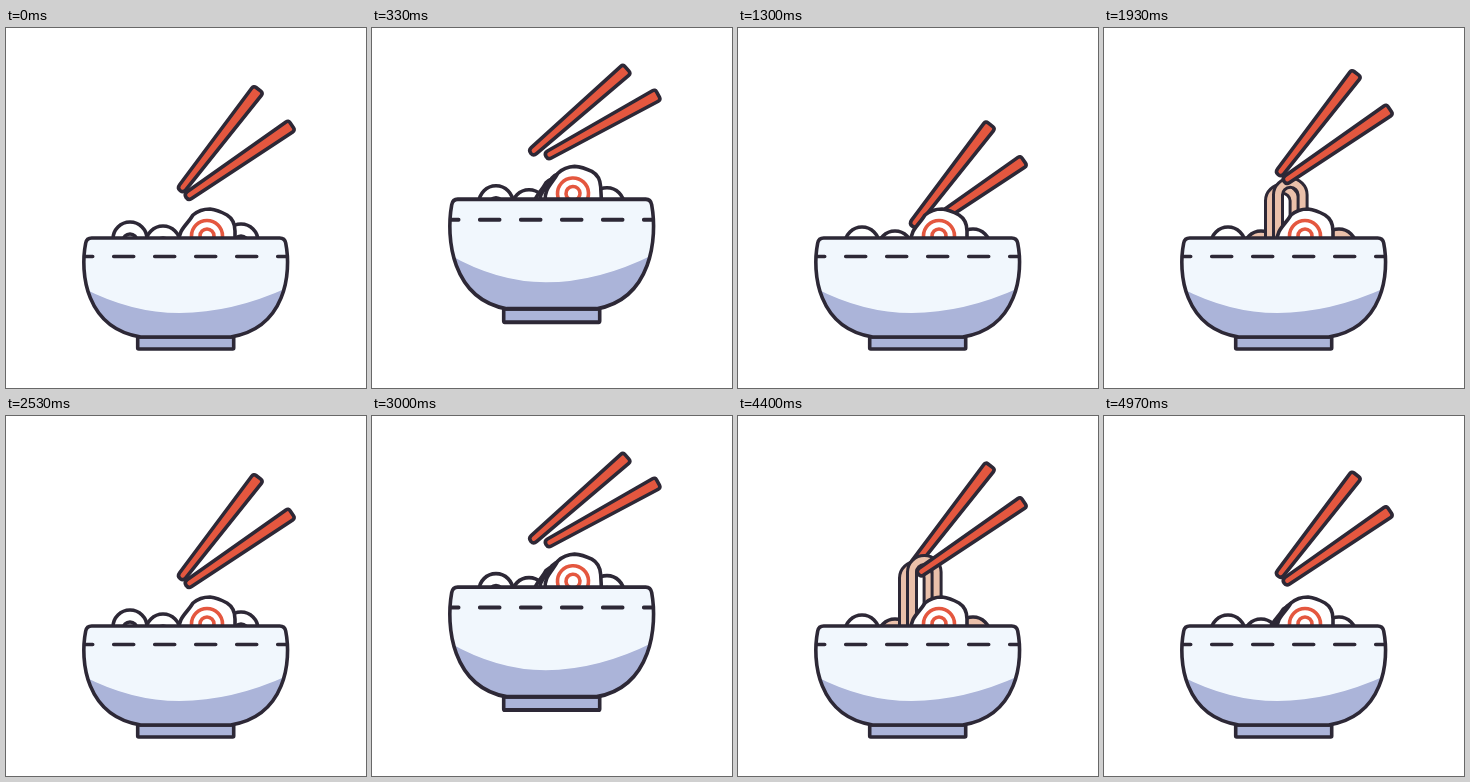
These frames come from a looping animation (360x360 px, 5000 ms). An HTML page with a canvas:

```html
<!DOCTYPE html>
<html lang="en">
<meta charset="utf-8">
<title>Noodle bowl</title>
<style>
html, body { margin: 0; width: 100%; height: 100%; overflow: hidden; background: #fff }
canvas { display: block }
</style>
<canvas id="stage" width="360" height="360"></canvas>
<script>
const c = document.getElementById('stage').getContext('2d');
const LOOP = 5000, CYCLE = 2667;
const INK = '#2d2836', RED = '#e4573f', PALE = '#f1f7fd', SHADE = '#abb4d9', PEACH = '#eac0aa';

// Smooth step from 0 to 1 between two times.
function ease(t, from, to) {
  const u = Math.min(1, Math.max(0, (t - from) / (to - from)));
  return u * u * (3 - 2 * u);
}

// Smooth rise to 1 at the peak, then back to 0.
const pulse = (t, from, peak, to) => ease(t, from, peak) - ease(t, peak, to);

function shape(path, fill, width = 3.6, stroke = INK) {
  const p = new Path2D(path);
  if (fill) { c.fillStyle = fill; c.fill(p); }
  if (width) { c.lineWidth = width; c.strokeStyle = stroke; c.stroke(p); }
}

function ring(x, y, r, fill, stroke = INK) {
  c.beginPath();
  c.arc(x, y, r, 0, 7);
  if (fill) { c.fillStyle = fill; c.fill(); }
  c.lineWidth = 3.6;
  c.strokeStyle = stroke;
  c.stroke();
}

function moved(x, y, draw, turn = 0) {
  c.save();
  c.translate(x, y);
  c.rotate(turn * Math.PI / 180);
  draw();
  c.restore();
}

function chopstick(x, y, angle) {
  moved(x, y, () => shape('M-6-1Q-6-4-3-4H3Q6-4 6-1L4 120Q4 124 0 124Q-4 124-4 120Z', RED), angle);
}

function noodles(drop) {
  for (const [x, top] of [[166, 150], [174, 144]]) {
    const arch = `M${x} 290V${top + drop + 12}a12.3 12 0 0 1 24.6 0V290`;
    shape(arch, null, 12);
    shape(arch, null, 6, PEACH);
  }
}

function loops(y, lifted) {
  for (const [x, low] of [[157, 4], [235, 2], [124, 0]]) {
    const fill = lifted && x > 130 ? PEACH : '#fff';
    ring(x, y + low + 1, 17, fill);
    ring(x, y + low + 3, 7, fill);
  }
}

function fishCake(y, turn, side) {
  const body = 'M-28 6C-29-6-20-11-14-21Q-7-27 3-27Q11-26 20-21Q28-16 28-5V14Q20 26 0 26Q-22 24-28 6Z';
  if (side > .03)
    for (const k of [12, 6])
      moved(201 - k * side, y + k * side * .8, () => shape(body, '#fff'), turn);
  moved(201, y, () => {
    shape(body, '#fff');
    for (const r of [15.5, 7]) ring(0, 0, r, null, RED);
  }, turn);
}

function bowl() {
  const body = 'M86 210H274Q279 210 280 215C286 245 280 300 225 309H135C80 300 74 245 80 215Q81 210 86 210Z';
  shape('M132 309H228V320Q228 321 227 321H133Q132 321 132 320Z', SHADE);
  c.save();
  c.clip(new Path2D(body));
  shape(body, PALE, 0);
  shape('M70 256Q122 285 174 285Q230 285 290 256V320H70Z', SHADE, 0);
  c.lineCap = 'round';
  c.setLineDash([20, 21]);
  shape('M67 228.5H294');
  c.restore();
  shape(body);
}

function draw(time) {
  const t = time % LOOP % CYCLE;
  const float = pulse(t, 60, 333, 760);
  const squash = pulse(t, 50, 140, 260), land = pulse(t, 540, 630, 780);

  // Bowl: crouch, jump, land, settle.
  const rise = -27 * pulse(t, 130, 340, 610) - 4 * pulse(t, 620, 680, 770);
  const wide = 1 + .02 * squash + .045 * land + .015 * pulse(t, 800, 933, 1100);
  const tall = 1 - .045 * squash + .108 * pulse(t, 180, 340, 540) - .03 * land;
  const rim = 321 + rise - 111 * tall;

  // Chopsticks: float with the jump, dip for noodles, lift them.
  const hand = 1.5 - 21 * float + 43 * pulse(t, 1030, 1400, 1700) - 17 * pulse(t, 1560, 1840, 2450);
  const drop = 80 * (1 - ease(t, 1380, 1740) + ease(t, 1850, 2200));

  // Toppings trail behind the bowl.
  const hop = 9 * pulse(t, 120, 590, 860);
  const side = ease(t, 130, 300) - ease(t, 670, 1050) + .65 * pulse(t, 2150, 2303, 2480);
  const sink = 5 * (ease(t, 680, 930) - ease(t, 2320, 2530)) + 2.5 * pulse(t, 130, 333, 600);

  c.fillStyle = '#fff';
  c.fillRect(0, 0, 360, 360);
  c.lineJoin = 'round';

  loops(rim + sink, t > 1450 && t < 2200);
  chopstick(250 + 2 * float, 63 + hand, 37.7 + 11 * float);
  if (drop < 75) noodles(drop);
  chopstick(282.5, 98 + hand - 10 * float, 55.7 + 5.4 * float);
  fishCake(rim - 2 - hop, -hop * .8, side);

  c.save();
  c.translate(179.7, 321 + rise);
  c.scale(wide, tall);
  c.translate(-180, -321);
  bowl();
  c.restore();
}

function tick() {
  draw(performance.now());
  requestAnimationFrame(tick);
}
tick();
</script>
</html>
```
